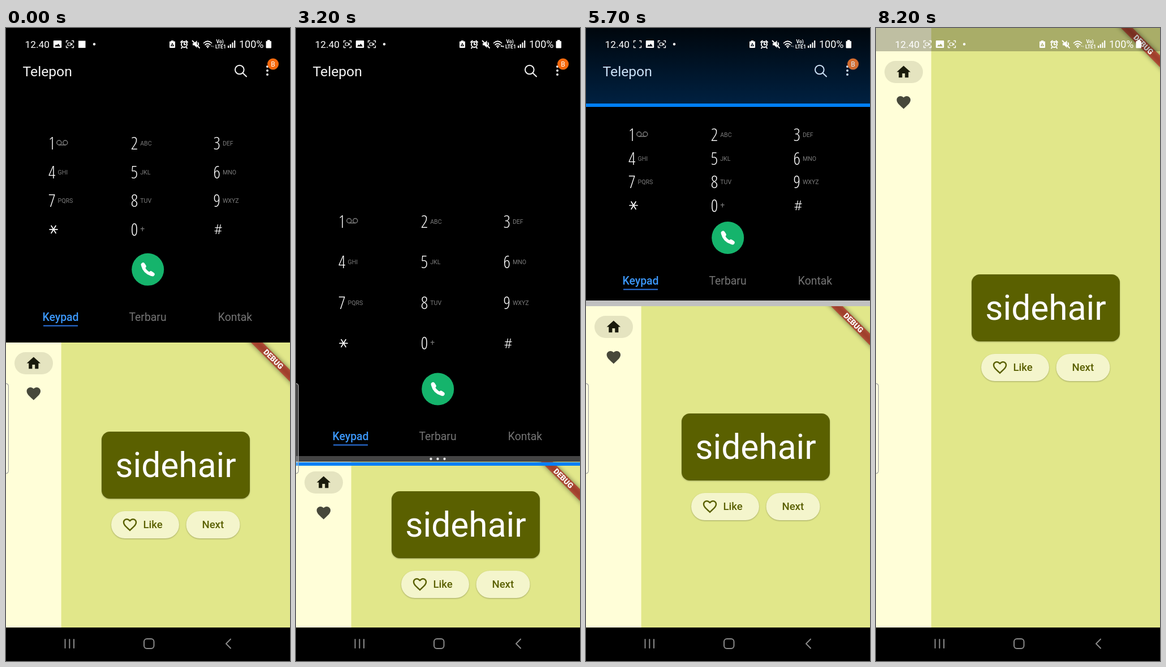
Animation of 502x1115 px, one loop 8500 ms. Source, as an HTML page:

```html
<!DOCTYPE html>
<html lang="id">
<head>
<meta charset="utf-8">
<title>Split screen</title>
<style>
  html, body { margin: 0; width: 100%; height: 100%; overflow: hidden; background: #000; }
  svg { display: block; width: 100%; height: 100%; }
  text { font-family: Roboto, "Open Sans", sans-serif; white-space: pre; }
  .mid { text-anchor: middle; }
  .digit { font-family: "Open Sans Condensed Light", "Open Sans Condensed", "Roboto Condensed", Roboto, sans-serif; font-weight: 300; font-stretch: 75%; fill: #fff; }
  .sub { font-size: 10.6px; fill: #7c7c7c; }
  .tab { font-size: 19.4px; fill: #757575; text-anchor: middle; }
  .line { fill: none; stroke-linecap: round; stroke-linejoin: round; }
  .raised { filter: drop-shadow(0 1.2px 1px rgba(0, 0, 0, .28)); }
  .label { font-size: 18.6px; font-weight: 500; fill: #5a6000; }
</style>
</head>
<body>
<svg id="stage" viewBox="0 0 502 1115"></svg>
<script>
const LOOP = 8500, NAV = 1056, NAV_H = 59;
const stage = document.getElementById('stage');
const $ = id => document.getElementById(id);
const set = (id, attrs) => {
  for (const k in attrs) $(id).setAttribute(k, attrs[k]);
};
const show = (id, on) => set(id, { display: on ? 'inline' : 'none' });
const move = (x, y) => `translate(${x},${y})`;

// Icons on a 24 unit grid
const HOME = 'M10 20v-6h4v6h5v-8h3L12 3 2 12h3v8z';
const HEART = 'M12 21.35l-1.45-1.32C5.4 15.36 2 12.28 2 8.5 2 5.42 4.42 3 7.5 3c1.74 0 3.41.81 4.5 2.09C13.09 3.81 14.76 3 16.5 3 19.58 3 22 5.42 22 8.5c0 3.78-3.4 6.86-8.55 11.54L12 21.35z';
const HEART_HOLE = 'M12.1 18.55l-.1.1-.1-.1C7.14 14.24 4 11.39 4 8.5 4 6.5 5.5 5 7.5 5c1.54 0 3.04.99 3.57 2.36h1.87C13.46 5.99 14.96 5 16.5 5c2 0 3.5 1.5 3.5 3.5 0 2.89-3.14 5.74-7.9 10.05z';
const icon = (d, x, y, fill, s = 1.22) =>
  `<path d="${d}" fill="${fill}" fill-rule="evenodd" transform="translate(${x},${y}) scale(${s}) translate(-12,-12)"/>`;

// The word app; its height is set later
const pane = id => `
  <g id="${id}"><g clip-path="url(#paneClip)">
    <rect id="${id}Bg" width="502" fill="#e1e78a"/>
    <rect id="${id}Rail" width="97.6" fill="#fffed8"/>
    <g id="${id}Items">
      <rect x="15" y="17" width="68" height="39" rx="19.5" fill="#e5e4c0"/>
      ${icon(HOME, 48.8, 36.5, '#1a1b0c')}
      ${icon(HEART, 48.8, 90, '#47483a')}
    </g>
    <g id="${id}Mid">
      <rect class="raised" x="169" y="-94" width="262" height="118" rx="14.5" fill="#5a6000"/>
      <text class="mid" x="300" y="-14" font-size="60.5" fill="#fff">sidehair</text>
      <rect class="raised" x="186" y="46" width="120" height="48" rx="24" fill="#f4f5cc"/>
      ${icon(HEART + HEART_HOLE, 219, 70, '#5a6000')}
      <text class="label" x="242.5" y="76">Like</text>
      <rect class="raised" x="318.5" y="46" width="95" height="48" rx="24" fill="#f4f5cc"/>
      <text class="label mid" x="365.8" y="76">Next</text>
    </g>
    <g transform="translate(502,0) rotate(45)">
      <rect x="-70" y="34.2" width="140" height="14.6" opacity=".5" filter="url(#soft)"/>
      <rect x="-70" y="34.2" width="140" height="14.6" fill="#b71c1c" opacity=".63"/>
      <text class="mid" y="46" font-size="13.4" font-weight="900" fill="#fff">DEBUG</text>
    </g>
    <rect id="${id}Shade" width="502" height="41" opacity=".25"/>
    <rect id="${id}Nav" width="502" height="${NAV_H}"/>
  </g></g>`;

function setPane(id, h, safe) {
  set(id + 'Bg', { height: h + NAV_H });
  set(id + 'Rail', { height: h + NAV_H });
  set(id + 'Items', { transform: move(0, safe) });
  set(id + 'Mid', { transform: move(0, h / 2) });
  set(id + 'Nav', { y: h });
  show(id + 'Shade', safe > 0);
}

const KEYS = ['1', '2ABC', '3DEF', '4GHI', '5JKL', '6MNO', '7PQRS', '8TUV', '9WXYZ', '*', '0+', '#'];
const voicemail = `<g class="line" stroke="#7c7c7c" stroke-width="1.5">
  <circle cx="4.8" cy="-1" r="4"/><circle cx="15.7" cy="-1" r="4"/><path d="M4.8 3H15.7"/></g>`;

function key(k, i) {
  const n = k[0];
  let face = `<text class="digit" x="-1">${n}</text>`;
  if (n === '*') face = '<path class="line" stroke="#fff" stroke-width="1.7" d="M1 0H15M4-6.5L12 6.5M12-6.5L4 6.5"/>';
  if (n === '#') face = '<text x="0" y="8.5" font-size="24" font-weight="300" fill="#fff">#</text>';
  const size = n === '0' ? ' style="font-size:14px"' : '';
  const sub = n === '1' ? voicemail : `<text class="sub" y="4"${size}>${k.slice(1)}</text>`;
  return `<g id="key${i}">${face}<g id="sub${i}">${sub}</g></g>`;
}

const phone = `
  <g id="phone">
    <g id="head">
      <text x="29.5" y="85" font-size="24.7" fill="#f4f4f4">Telepon</text>
      <g class="line" stroke="#f4f4f4" stroke-width="2"><circle cx="412.8" cy="73.5" r="7.8"/><path d="M418.5 79.3L425 85.5"/></g>
      <g fill="#f4f4f4"><circle cx="462" cy="68" r="2"/><circle cx="462" cy="75" r="2"/><circle cx="462" cy="82" r="2"/></g>
      <circle cx="472" cy="63.5" r="10" fill="#f7690c"/>
      <text class="mid" x="472" y="68" font-size="12" fill="#fff">B</text>
    </g>
    ${KEYS.map(key).join('')}
    <g id="call"><circle r="28.5" fill="#15b46c"/>
      <g class="line" stroke="#fff"><path stroke-width="5.5" d="M-9-7Q-6 5 7 9"/>
        <path stroke-width="7" d="M-8.5-8.5L-6.500-5.500M5.500 6.500L8.500 8.500"/></g></g>
    <g id="tabs">
      <text class="tab" x="96.5" style="fill:#3c98fb;font-weight:500">Keypad</text>
      <rect x="66" y="7.5" width="61" height="2" fill="#2b74e2"/>
      <text class="tab" x="250.5">Terbaru</text>
      <text class="tab" x="405">Kontak</text>
    </g>
  </g>`;

const corners = 'M-6.5-3V-6H-3.5M3.5-6H6.5V-3M6.5 3V6H3.5M-3.5 6H-6.5V3';
const rec = (x, id) => `<g transform="${move(x, 28.5)}">
  <path class="line" stroke="#fff" stroke-width="1.3" d="${corners}"/>
  <g id="${id}"><rect class="line" stroke="#fff" stroke-width="1.2" x="-3.8" y="-2.5" width="5.4" height="5" rx="1"/><path fill="#fff" d="M2-.5L4.3-2.5V2.5L2 .5z"/></g></g>`;
const photo = x => `<path transform="${move(x, 28.5)}" fill="#fff" fill-rule="evenodd"
  d="M-6-6.5h12q1.2 0 1.2 1.2v10.6q0 1.2-1.2 1.2h-12q-1.2 0-1.2-1.2v-10.6q0-1.2 1.2-1.2zM-5 4h10l-3.5-5-2.5 3-1.5-1.5z"/>`;

const status = `
  <g fill="#fff">
    <text x="33.5" y="35" font-size="17.3">12.40</text>
    <g id="early">${photo(91)}${rec(113, 'camA')}<rect x="128" y="22.5" width="12.5" height="12.5"/></g>
    <g id="late">${rec(91, 'blink')}${photo(113)}${rec(134, 'camB')}</g>
    <circle cx="156" cy="28.5" r="2.2"/>
    <path fill-rule="evenodd" d="M292 22h4v1.5h2q1 0 1 1V34q0 1-1 1h-8q-1 0-1-1V24.5q0-1 1-1h2zM294 26l-3.2 6h6.4zM294 28.5l1.4 2.3h-2.8z"/>
    <g class="line" stroke="#fff" stroke-width="1.9"><circle cx="315" cy="29" r="5"/><path d="M315 26v3.3h2.5M309 25l2.7-2.7M321 25l-2.7-2.7M311 34.5l-1 1M319 34.5l1 1"/></g>
    <path d="M330 26.5h3l4.5-4.5v13l-4.5-4.5h-3z"/>
    <path class="line" stroke="#fff" stroke-width="1.8" d="M329.5 22.5L342 35M339.5 26q1.5 2.5 0 4.5"/>
    <g class="line" stroke="#fff" stroke-width="1.7"><path d="M349.5 26.5q7-6.5 14 0M352 29.5q4.5-4 9 0M354.5 32q2-1.5 4 0"/></g>
    <circle cx="356.5" cy="34" r="1.3"/>
    <path id="traffic" d="M361.5 33l1.8-3 1.8 3zM364.5 31.5h3.4l-1.7 3z"/>
    <g font-size="8.6" font-weight="700"><text x="371.5" y="27">Vo)</text><text x="370" y="36">LTE1</text></g>
    <path d="M392 31h2.2v4h-2.2zM395.7 28.5h2.2v6.5h-2.2zM399.4 25.5h2.2v9.5h-2.2zM403.1 22h2.2v13h-2.2z"/>
    <text x="412" y="35" font-size="18">100%</text>
    <path d="M462 21h4.5v2h1.5q1 0 1 1v10.5q0 1-1 1h-7.5q-1 0-1-1V24q0-1 1-1h1.5z"/>
  </g>`;

stage.innerHTML = `
  <defs>
    <clipPath id="paneClip"><rect width="502" height="2000"/></clipPath>
    <clipPath id="phoneClip"><rect id="phoneBox" width="502"/></clipPath>
    <filter id="soft" x="-20%" y="-150%" width="140%" height="400%"><feGaussianBlur stdDeviation="4.5"/></filter>
    <linearGradient id="tint" x1="0" y1="0" x2="0" y2="1">
      <stop offset="0" stop-color="#0080ff" stop-opacity=".26"/>
      <stop offset="1" stop-color="#0080ff" stop-opacity=".05"/>
    </linearGradient>
  </defs>
  <rect width="502" height="1115"/>
  <g clip-path="url(#phoneClip)">${phone}</g>
  ${pane('main')}${pane('ghost')}
  <g id="split">
    <g id="bar"><rect id="barBg" width="502" height="10"/>
      <g id="dots" fill="#e6e6e6"><circle cx="238.5" cy="5" r="2.2"/><circle cx="250.5" cy="5" r="2.2"/><circle cx="262.5" cy="5" r="2.2"/></g></g>
    <rect id="glow" width="502" fill="url(#tint)"/>
    <rect id="edge" width="502" height="6" fill="#007ff5"/>
  </g>
  <rect id="navBg" y="${NAV}" width="502" height="${NAV_H}"/>
  <g id="nav" class="line" stroke-width="2">
    <path d="M104.5 1077v15M112.3 1077v15M120 1077v15"/>
    <rect x="244" y="1076" width="17.5" height="17" rx="5"/>
    <path d="M397 1076.5l-8 8 8 8"/>
  </g>
  ${status}
  <rect x="-8" y="626" width="12.4" height="159" rx="5" fill="#fff" fill-opacity=".27" stroke="#a0a0a0" stroke-width="1.2"/>`;

// Smooth progress of t from a to b
function ease(t, a, b) {
  const x = Math.min(1, Math.max(0, (t - a) / (b - a)));
  return x * x * (3 - 2 * x);
}

// Keypad layout by divider position
const LAYOUT = [
  { p: 333, row: 109, step: 40.8, call: 287.3, x: 49, dx: 168, size: 27 },
  { p: 490, row: 188, step: 41.5, call: 369.5, x: 76, dx: 145.7, size: 31 },
  { p: 554, row: 203, step: 50.6, call: 425.3, x: 76, dx: 145.7, size: 31 },
  { p: 764, row: 340.5, step: 71.6, call: 636, x: 76, dx: 145.7, size: 31 }
];
function layoutAt(p) {
  let i = 0;
  while (i < 2 && p > LAYOUT[i + 1].p) i++;
  const a = LAYOUT[i], b = LAYOUT[i + 1], f = (p - a.p) / (b.p - a.p), out = {};
  for (const k in a) out[k] = a[k] + (b[k] - a[k]) * f;
  return out;
}

function drawPhone(p, full) {
  const l = layoutAt(p);
  const big = Math.min(1, Math.max(0, (p - 400) / 80));
  set('phoneBox', { height: full ? 1115 : p - 10 });
  KEYS.forEach((k, i) => {
    set('key' + i, { transform: move(l.x + (i % 3) * l.dx, l.row + Math.floor(i / 3) * l.step) });
    set('sub' + i, { transform: move(k[0] === '1' ? l.size * .42 : l.size * .5, 0) });
    const d = $('key' + i).querySelector('.digit');
    if (d) {
      d.setAttribute('font-size', l.size);
      d.setAttribute('y', l.size * .355);
    }
  });
  set('call', { transform: move(250.7, l.call) });
  set('tabs', { transform: move(0, p - 38), opacity: big });
  set('head', { opacity: big });
}

// Growth to full screen, one step per 100 ms from 6100
const GROW = [
  { top: 455, s: .9, ghost: .8, h: 680 },
  { top: 285, s: .935, ghost: .4, h: 790 },
  { top: 144, s: .965, ghost: .13, h: 871 },
  { top: 62, s: .985, ghost: .03, h: 960 },
  { top: 20, s: .996, ghost: 0, h: 1040 },
  { top: 4, s: 1, ghost: 0, h: 1090 },
  { top: 0, s: 1, ghost: 0, h: 1115 }
];
const DRAGS = [[100, 400], [1700, 2600], [3600, 4500], [5200, 6100]];

function draw(time) {
  const t = Math.floor(time / 100) * 100;
  const full = t >= 6100, growing = full && t < 6700;
  const p = Math.round(554 - 221 * ease(t, 400, 700) + 431 * ease(t, 2600, 3000) - 274 * ease(t, 4400, 4800));
  const y = Math.round(554 - 221 * ease(t, 0, 400) + 432 * ease(t, 1700, 2145)
    - 275 * ease(t, 3600, 4200) - 445 * ease(t, 5200, 5900));
  const drag = DRAGS.findIndex(([a, b]) => t >= a && t < b);

  drawPhone(p, full);
  if (full) {
    const g = GROW[Math.min(6, (t - 6100) / 100)];
    setPane('main', NAV, 41);
    set('main', { transform: `translate(0,${g.top}) scale(1,${g.s})` });
    setPane('ghost', NAV - p, 0);
    set('ghost', { transform: `translate(0,${g.top}) scale(1,${g.h / (1115 - p)})`, opacity: g.ghost });
  } else {
    setPane('main', NAV - p, 0);
    set('main', { transform: move(0, p) });
  }
  show('ghost', growing);

  show('split', t >= 100 && !full);
  set('bar', { transform: move(0, p - 10) });
  set('barBg', { fill: drag < 0 ? '#444' : '#c0c0c0' });
  show('dots', drag < 0);
  set('edge', { y });
  show('glow', drag >= 0);
  const down = drag === 1;
  set('glow', down
    ? { y: y + 3, height: NAV - y - 3, transform: '' }
    : { y: 0, height: Math.max(0, y + 3), transform: `translate(0,${y + 3}) scale(1,-1)` });

  show('navBg', !growing);
  set('nav', { stroke: growing ? '#f6f6dc' : '#8a8a8a' });
  show('early', t < 200);
  show('late', t >= 200);
  show('blink', Math.floor((t + 300) / 500) % 2 === 1);
  set('traffic', { opacity: t >= 3200 && t < 5200 ? 1 : .4 });
}

const start = performance.now();
function tick() {
  draw((performance.now() - start) % LOOP);
  requestAnimationFrame(tick);
}
tick();
</script>
</body>
</html>
```
